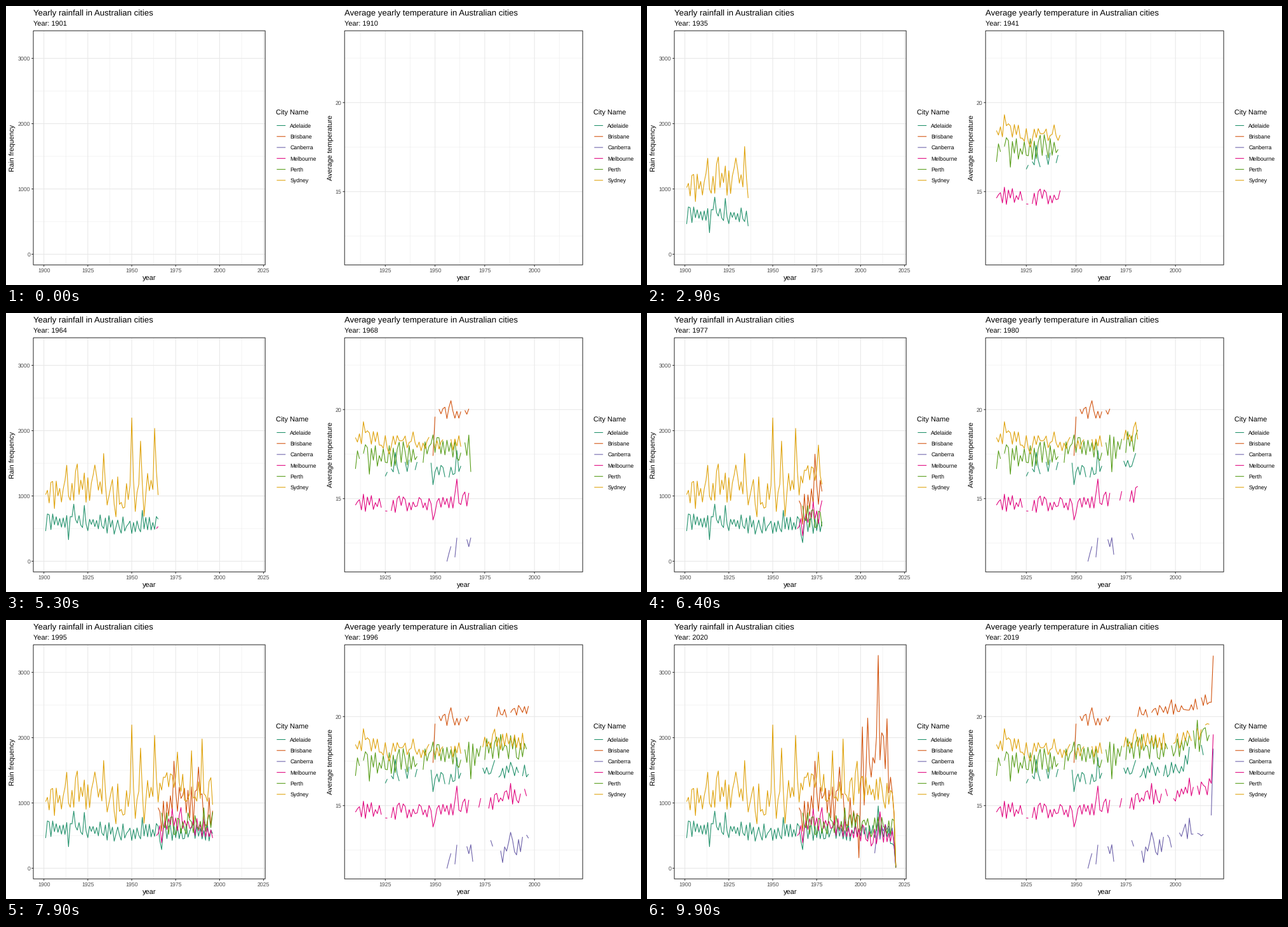
Write a matplotlib script that moves like this. It is 1000x440 px and loops after 10 s.

```python
import matplotlib.pyplot as plt
import numpy as np
from matplotlib.animation import FuncAnimation

W, H, DPI = 1000, 440, 100
FRAMES, STEP = 100, 100
PX = 72 / DPI
TOP, BOTTOM, WIDTH = 39.06, 408.3, 1.07

plt.rcParams["font.family"] = "Liberation Sans"
plt.rcParams["text.hinting"] = "none"

COLORS = {
    "Adelaide": "#1e8f69",
    "Brisbane": "#d1500a",
    "Canberra": "#6a5ea8",
    "Melbourne": "#e0007c",
    "Perth": "#549b14",
    "Sydney": "#dea006",
}


def series(seed, span, level, spread, peaks, gaps=()):
    """Yearly zigzag around a level, through a few peaks, broken at gaps."""
    rng = np.random.default_rng(seed)
    years = np.arange(span[0], span[1] + 1)
    n = len(years)
    vals = np.interp(years, np.linspace(*span, len(level)), level)
    sign = np.cumprod(np.where(rng.random(n) < 0.8, -1, 1))
    vals += spread * sign * rng.uniform(0.1, 1.2, n)
    for year, v in peaks.items():
        vals[year - span[0]] = v
    for a, b in gaps:
        vals[a - span[0]:b - span[0] + 1] = np.nan
    return years, vals


RAIN = {
    "Adelaide": series(
        3, (1901, 2020), (600, 620, 540, 560, 550, 560, 500), 120,
        {1914: 330, 1917: 875, 1923: 855, 1956: 780, 1967: 285, 2010: 955,
         2019: 340, 2020: 20}),
    "Brisbane": series(
        5, (1965, 2020), (750, 1000, 950, 700, 1750, 900), 250,
        {1974: 1640, 1988: 1550, 1999: 160, 2001: 2165, 2004: 2300,
         2010: 3260, 2012: 2075, 2013: 2020, 2015: 2290, 2020: 5}),
    "Canberra": series(
        2, (2008, 2020), (400, 650, 500), 70,
        {2008: 230, 2010: 705, 2019: 340, 2020: 15}),
    "Melbourne": series(
        8, (1964, 2020), (600, 720, 650, 520, 520, 500), 130,
        {1967: 390, 1973: 910, 1978: 930, 2006: 340, 2011: 865, 2019: 400,
         2020: 30}),
    "Perth": series(
        4, (1967, 2020), (700, 680, 700, 680, 650), 150,
        {1970: 850, 1991: 925, 1996: 860, 2006: 480, 2020: 10}),
    "Sydney": series(
        6, (1901, 2020), (950, 1150, 1100, 1000, 1300, 1250, 1200, 1100), 210,
        {1901: 1020, 1913: 1470, 1919: 1490, 1929: 1475, 1934: 1650,
         1941: 680, 1950: 2195, 1955: 1840, 1957: 690, 1963: 2035,
         1976: 1780, 1984: 1800, 1990: 1980, 1998: 1640, 2019: 850,
         2020: 40}),
}

TEMP = {
    "Adelaide": series(
        1, (1925, 2014), (16.6, 16.8, 16.5, 16.8, 17, 17.1, 18), 0.4,
        {1930: 17.6, 1949: 15.78, 1961: 17.7, 1980: 17.55, 2007: 18.3},
        [(1927, 1927), (1933, 1934), (1938, 1939), (1942, 1947),
         (1956, 1956), (1964, 1973), (1981, 1981), (1993, 1993),
         (2008, 2012)]),
    "Brisbane": series(
        1, (1949, 2019), (19.8, 19.8, 20, 20.3, 20.4, 20.5, 21.1), 0.3,
        {1949: 17.4, 1950: 19.6, 1958: 20.5, 1998: 20.95, 2018: 20.8,
         2019: 23.42},
        [(1951, 1951), (1964, 1964), (1968, 1980), (1987, 1987),
         (2012, 2012)]),
    "Canberra": series(
        1, (1956, 2019), (12.1, 12.4, 12.6, 12.7, 13.6, 14), 0.5,
        {1956: 11.47, 1984: 11.8, 1988: 13.5, 2007: 14.3, 2018: 14.45,
         2019: 18.2},
        [(1959, 1959), (1962, 1965), (1970, 1977), (1980, 1982),
         (1995, 1995), (1999, 2001), (2010, 2010), (2015, 2017)]),
    "Melbourne": series(
        2, (1910, 2019), (14.7, 14.7, 14.6, 14.9, 15.3, 15.7, 16.1), 0.4,
        {1914: 15.25, 1949: 13.8, 1961: 16.1, 1988: 16.25, 2007: 16.55,
         2018: 16.25, 2019: 19.0},
        [(1924, 1924), (1927, 1927), (1968, 1971), (1974, 1976),
         (1994, 1994), (1997, 1998), (2010, 2010)]),
    "Perth": series(
        2, (1910, 2017), (17.1, 17.4, 17.7, 17.8, 18.2, 18.3, 18.9), 0.6,
        {1915: 18.03, 1917: 16.37, 1949: 18.58, 1968: 16.5, 1983: 19.0,
         2011: 19.8},
        [(1913, 1913), (1942, 1943), (1964, 1964), (1974, 1974),
         (1997, 1997), (2008, 2008)]),
    "Sydney": series(
        9, (1910, 2017), (18.4, 18.2, 18, 18.2, 18.6, 18.6, 19.2), 0.4,
        {1910: 18.43, 1914: 19.32, 1927: 17.51, 1939: 18.75, 1980: 19.3,
         2016: 19.6},
        [(1948, 1949), (1955, 1957), (1964, 1973), (1996, 1998),
         (2009, 2010), (2014, 2014)]),
}

fig = plt.figure(figsize=(W / DPI, H / DPI), dpi=DPI, facecolor="white")
ax = fig.add_axes([0, 0, 1, 1])
ax.set(xlim=(0, W), ylim=(H, 0))
ax.axis("off")


def line(xs, ys, color, width=WIDTH, z=1):
    return ax.plot(xs, ys, color=color, lw=width * PX, zorder=z,
                   solid_capstyle="butt", snap=False)[0]


def text(x, y, s, size, color="black", **kw):
    return ax.text(x, y, s, fontsize=size * PX, color=color, **kw)


class Panel:
    def __init__(self, offset, left, years, x0, dx, y0, dy, data):
        self.offset, self.left, self.right = offset, left, offset + 408.15
        self.first, self.last = years
        self.px = lambda v: x0 + dx * v
        self.py = lambda v: y0 - dy * v
        self.data = data

    def grid(self, xmajor, ymajor, yminor):
        sides = [self.left, self.right]
        for x in self.px(np.arange(1912.5, 2020, 25)):
            line([x, x], [TOP, BOTTOM], "#ebebeb", WIDTH / 2)
        for y in self.py(np.array(yminor)):
            line(sides, [y, y], "#ebebeb", WIDTH / 2)
        for v in xmajor:
            x = self.px(v)
            line([x, x], [TOP, BOTTOM], "#e8e8e8")
            line([x, x], [BOTTOM, BOTTOM + 2.75], "#333333")
            text(x, 419.7, str(v), 8.8, "#4d4d4d", ha="center")
        for v in ymajor:
            y = self.py(v)
            line(sides, [y, y], "#e8e8e8")
            line([self.left - 2.75, self.left], [y, y], "#333333")
            text(self.left - 4.95, y + 3.15, str(v), 8.8, "#4d4d4d",
                 ha="right")

    def labels(self, title, ylabel):
        line([self.left, self.right, self.right, self.left, self.left],
             [TOP, TOP, BOTTOM, BOTTOM, TOP], "#333333", z=4)
        text(self.left, 15, title, 13.2)
        self.sub = text(self.left, 31.3, "", 11)
        text((self.left + self.right) / 2, 432.3, "year", 11, ha="center")
        text(self.offset + 13.4, (TOP + BOTTOM) / 2, ylabel, 11, rotation=90,
             rotation_mode="anchor", ha="center")

    def legend(self):
        x = self.offset + 424.65
        text(x, 172.2, "City Name", 11)
        for i, (city, color) in enumerate(COLORS.items()):
            y = 188.5 + 17.28 * i
            line([x + 1.73, x + 15.55], [y, y], color)
            text(x + 22.78, y + 3.15, city, 8.8)

    def curves(self):
        self.lines = {c: line([], [], COLORS[c], z=3) for c in COLORS}

    def update(self, i):
        span = self.last - self.first
        year = self.first + i * span / (FRAMES - 1)
        self.sub.set_text(f"Year: {int(year + 1e-6)}")
        for city, (years, vals) in self.data.items():
            due = np.round((years - self.first) * (FRAMES - 1) / span)
            on = due <= i
            self.lines[city].set_data(self.px(years[on]), self.py(vals[on]))


rain = Panel(0, 43.03, (1901, 2020), 59.65 - 1900 * 2.768, 2.768,
             391.5, 0.10298, RAIN)
temp = Panel(500, 533.2, (1910, 2019), 597.3 - 1925 * 3.132, 3.132,
             152.3 + 20 * 28.08, 28.08, TEMP)

rain.grid(range(1900, 2026, 25), range(0, 3001, 1000), (500, 1500, 2500))
temp.grid(range(1925, 2001, 25), (15, 20), (12.5, 17.5, 22.5))
rain.labels("Yearly rainfall in Australian cities", "Rain frequency")
temp.labels("Average yearly temperature in Australian cities",
            "Average temperature")
for panel in (rain, temp):
    panel.legend()
    panel.curves()


def update(i):
    artists = []
    for panel in (rain, temp):
        panel.update(i)
        artists += [panel.sub, *panel.lines.values()]
    return artists


anim = FuncAnimation(fig, update, frames=FRAMES, interval=STEP, repeat=True,
                     repeat_delay=0, blit=False)
plt.show()
```
